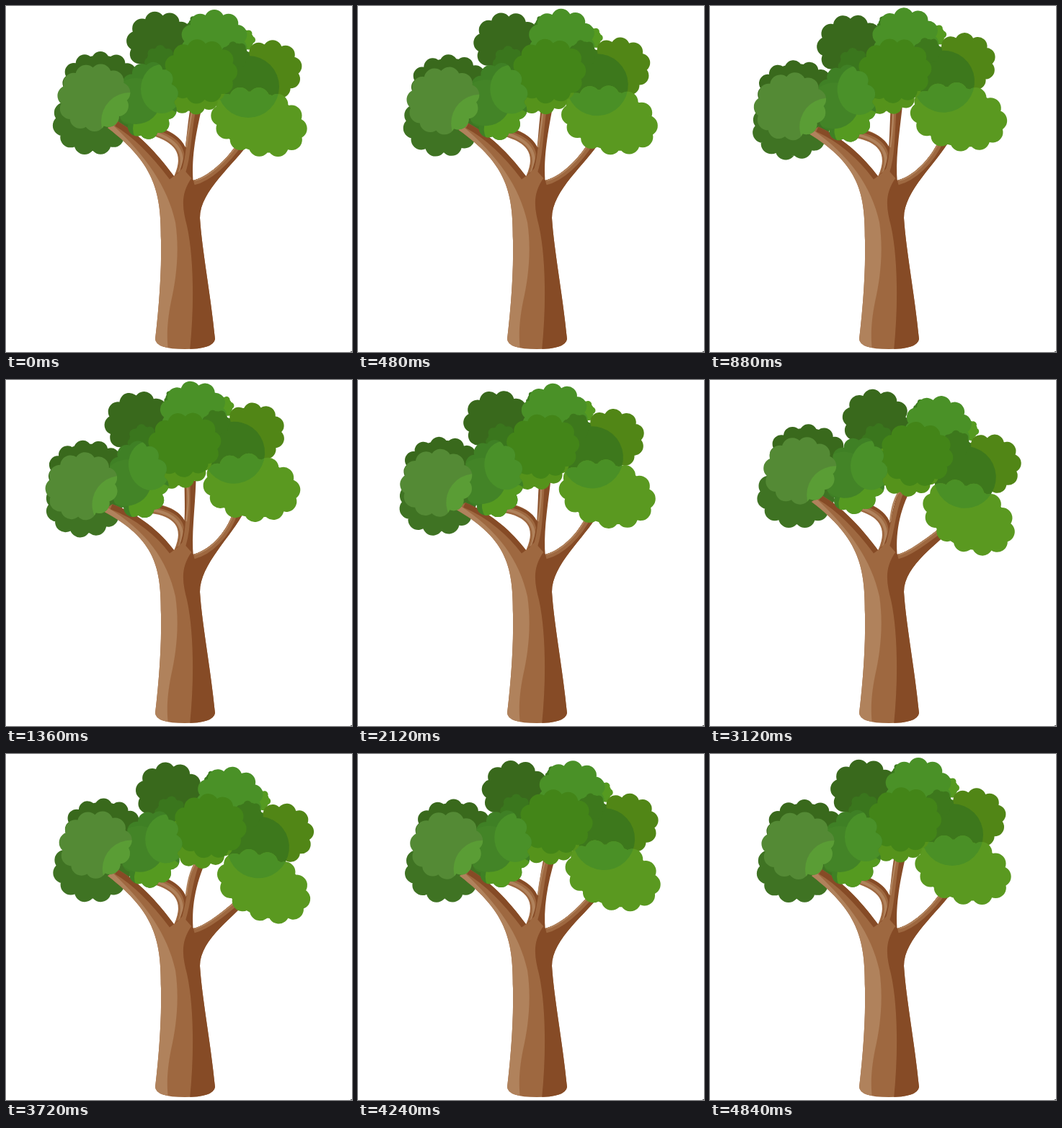
Recreate the animation shown at these times as an HTML page with a canvas. Size 480 px wide and 480 px high, loop 5 s.

```html
<!DOCTYPE html>
<html lang="en">
<head>
<meta charset="utf-8">
<title>Swaying tree</title>
<style>
  html, body { margin: 0; height: 100%; overflow: hidden; background: #fff; }
  canvas { display: block; width: 480px; height: 480px; }
</style>
</head>
<body>
<canvas id="stage" width="480" height="480"></canvas>
<script>
const ctx = document.getElementById('stage').getContext('2d');
const TAU = Math.PI * 2, LOOP = 5000, SWING = 1600, STEP = 40;
const LIGHT = '#b0825c', WOOD = '#9e6840', DARK = '#864b26';

// Each group leans left, then right: [degrees, dx, dy] around its pivot.
const groups = {
  top:    { pivot: [250, 240], left: [-10, 0, 0],  right: [5, 0, 8] },
  crown:  { pivot: [250, 240], left: [-9, 0, 0],   right: [8.5, 0, 9] },
  center: { pivot: [250, 240], left: [-9, 0, 0],   right: [6.5, 0, 9] },
  right:  { pivot: [262, 243], left: [-7, 0, -2],  right: [12, -7, 10] },
  mid:    { pivot: [205, 185], left: [-12, -3, 5], right: [6, 1, 2] },
  front:  { pivot: [215, 235], left: [-9, -2, 6],  right: [1, 1, 0] },
  back:   { pivot: [215, 235], left: [-9, -2, 7],  right: [2, 0, 1] },
  low:    { pivot: [215, 235], left: [-7, -2, 0],  right: [0.5, 0, 0] }
};

function ellipse(x, y, rx, ry = rx, tilt = 0) {
  const path = new Path2D();
  path.ellipse(x, y, rx, ry, tilt, 0, TAU);
  return path;
}

// Tilted ellipse with a ring of round lobes
function leaf(x, y, rx, ry, lobes = 10, turn = 0, tilt = 0) {
  const path = ellipse(x, y, rx * 0.87, ry * 0.87, tilt);
  const r = Math.min(rx, ry) * 0.31;
  const cos = Math.cos(tilt), sin = Math.sin(tilt);
  for (let i = 0; i < lobes; i++) {
    const a = turn + i * TAU / lobes;
    const u = (rx - r) * Math.cos(a), v = (ry - r) * Math.sin(a);
    const lx = x + u * cos - v * sin, ly = y + u * sin + v * cos;
    path.moveTo(lx + r, ly);
    path.arc(lx, ly, r, 0, TAU);
  }
  return path;
}

const leaves = {
  low: leaf(118, 161, 54, 46, 11, 1.15, 0.1),
  back: leaf(131, 103, 53, 40, 11, -1.57),
  front: leaf(122, 127, 51, 47, 11, -1.7, -0.2),
  mid: leaf(197, 131, 42, 54, 11, 1.4, 0.1),
  top: leaf(214, 51, 47, 44, 10, -1.8),
  bright: leaf(289, 49, 47, 44, 10, -1.57),
  yellow: leaf(366, 89, 45, 42, 10, -1.45),
  under: leaf(258, 112, 47, 39, 11, 1.4),
  center: leaf(270, 91, 51, 45, 11, -1.7),
  right: leaf(351, 161, 68, 47, 12, -1.75, 0.28),
  farTop: leaf(264, 27, 13, 14, 6, 0),
  farRight: leaf(329, 47, 17, 16, 7, 0),
  dark: leaf(318, 68, 20, 19, 7, -1.8),
  gap: leaf(214, 78, 22, 24, 8, 0)
};
const shade = ellipse(336, 112, 43);

let wLeft = 0, wRight = 0;
const blend = (a, b) => a * wLeft + b * wRight;

function setLean(t) {
  const phase = Math.min(t / SWING, 3), part = Math.min(Math.floor(phase), 2);
  const e = 0.5 - 0.5 * Math.cos(Math.PI * (phase - part));
  wLeft = [e, 1 - e, 0][part];
  wRight = [0, e, 1 - e][part];
}

function pose(name) {
  const { pivot: [x, y], left, right } = groups[name];
  const [deg, dx, dy] = left.map((v, i) => blend(v, right[i]));
  ctx.setTransform(1, 0, 0, 1, x + dx, y + dy);
  ctx.rotate(deg * Math.PI / 180);
  ctx.translate(-x, -y);
}

function fill(path, color, group) {
  if (group) pose(group);
  ctx.fillStyle = color;
  ctx.fill(path);
}

function inside(path, group, draw) {
  ctx.save();
  if (group) pose(group);
  ctx.clip(path);
  draw();
  ctx.restore();
}

function stroke(d, color, width) {
  ctx.strokeStyle = color;
  ctx.lineWidth = width;
  ctx.stroke(new Path2D(d));
}

function drawWood() {
  ctx.setTransform(1, 0, 0, 1, 0, 0);
  const lx = blend(-8, 0), ly = blend(13, 0);
  const rx = blend(-8, 4), ry = blend(-6, 12);
  const cx = blend(-9, 8), cy = blend(0, 9);
  const sx = blend(-4, 1), sy = blend(5, 1);

  const small = (dx, dy) =>
    `M${204 + sx + dx} ${171 + sy + dy}C${234 + dx} ${180 + dy} ${256 + dx} ${198 + dy} ${239 + dx} 238`;
  stroke(small(1, 2), WOOD, 14);
  stroke(small(5, -1), DARK, 4);
  stroke(small(-1, 4), LIGHT, 4);

  const stem = `${256 + cx} ${140 + cy}`;
  fill(new Path2D(`M234 242C251 218 248 185 ${stem}L${272 + cx} ${140 + cy}C262 182 257 215 260 246Z`), DARK);
  stroke(`M244 236C254 212 253 180 ${261 + cx} ${140 + cy}`, WOOD, 6);
  stroke(`M250 196C252 180 255 162 ${259 + cx} ${140 + cy}`, LIGHT, 2.5);

  const leftTop = `M${155 + lx} ${160 + ly}C${189 + lx / 2} ${180 + ly / 2} 215 212 233 236`;
  const rightTop = `C280 237 305 215 ${323 + rx} ${188 + ry}`;
  const outline = new Path2D(leftTop + 'L245 225L260 242' + rightTop +
    `L${338 + rx} ${188 + ry}C${317 + rx / 2} ${220 + ry / 2} 269 256 269 294` +
    'C272 340 284 400 290 462Q288 476 248 476Q208 476 207 462C212 420 216 370 215 325' +
    `C215 262 209 221 ${141 + lx} ${169 + ly}Z`);
  fill(outline, WOOD);
  inside(outline, null, () => {
    fill(new Path2D('M258 238C240 262 246 285 251 305C261 350 261 420 255 478H300V300L360 180H320Z'), DARK);
    stroke(leftTop, DARK, 15);
    stroke('M260 242' + rightTop, WOOD, 13);
    stroke('M262 241' + rightTop, LIGHT, 4);
    fill(new Path2D(`M${147 + lx} ${164 + ly}C194 208 224 250 235 300C241 340 236 380 229 410` +
      `C223 440 223 460 225 478H195V300L${130 + lx} ${170 + ly}Z`), LIGHT);
  });
}

function drawTree() {
  fill(leaves.back, '#39691c', 'back');
  fill(leaves.low, '#3f7323', 'low');
  drawWood();

  fill(leaves.farTop, '#3b7a1e', 'crown');
  fill(leaves.top, '#39691c', 'top');
  fill(leaves.gap, '#3a761d', 'center');
  fill(leaves.farRight, '#559a20', 'crown');
  fill(leaves.yellow, '#518616', 'crown');
  fill(leaves.bright, '#4a9127', 'crown');
  fill(shade, '#3d781c', 'crown');
  fill(leaves.dark, '#3d781c', 'crown');

  fill(leaves.right, '#5a9920', 'right');
  inside(leaves.right, 'right', () => fill(shade, '#4a9026', 'crown'));

  fill(leaves.under, '#55931b', 'center');
  fill(leaves.center, '#438518', 'center');

  fill(leaves.mid, '#3f8025', 'mid');
  inside(leaves.mid, 'mid', () => {
    fill(ellipse(212, 170, 36, 30), '#559a20');
    fill(ellipse(180, 132, 34, 32), '#438427');
    fill(ellipse(216, 115, 29, 34), '#4a9129');
  });

  fill(leaves.front, '#548a35', 'front');
  inside(leaves.front, 'front', () => fill(ellipse(172, 160, 40), '#5a9d35'));

  ctx.setTransform(1, 0, 0, 1, 0, 0);
  ctx.fillStyle = '#555';
  ctx.fillRect(478, 479, 2, 1);
}

function frame(now) {
  const t = now % LOOP;
  setLean(Math.floor(t / STEP) * STEP);
  ctx.setTransform(1, 0, 0, 1, 0, 0);
  ctx.clearRect(0, 0, 480, 480);
  drawTree();
  requestAnimationFrame(frame);
}
requestAnimationFrame(frame);
</script>
</body>
</html>
```
